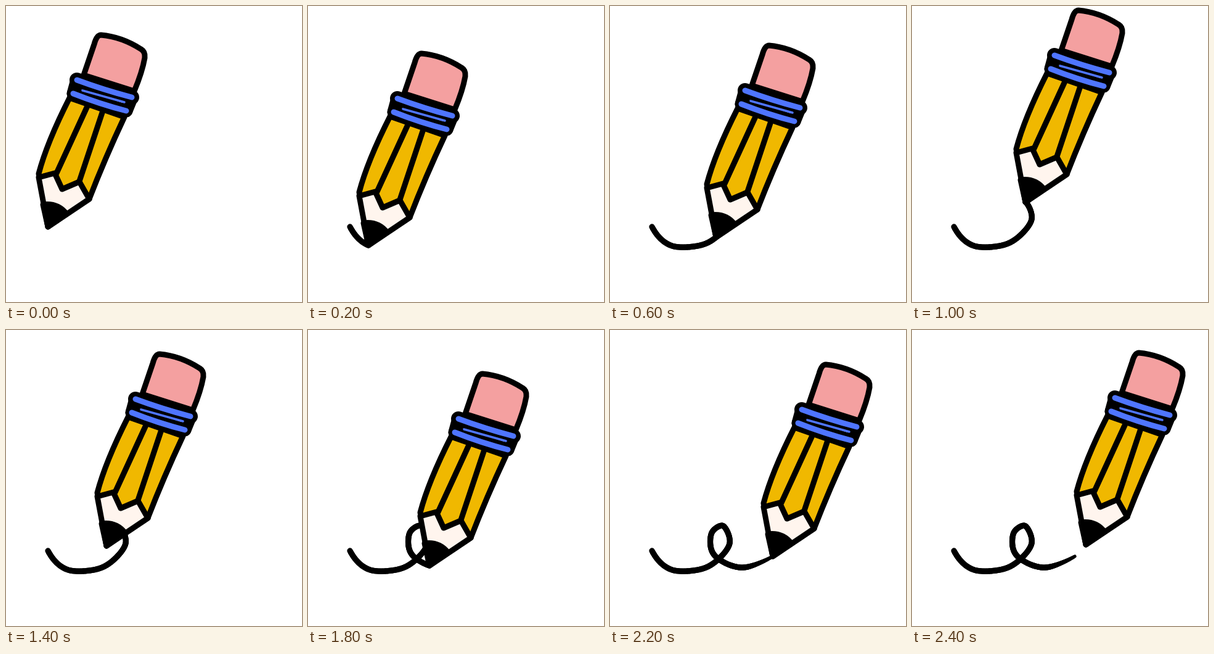
These frames come from a looping animation (480 by 480 pixels, 2.6 s). An HTML page with a canvas:

```html
<!DOCTYPE html>
<html lang="en">
<head>
<meta charset="utf-8">
<title>Pencil drawing a loop</title>
<style>
  html, body { margin: 0; width: 100%; height: 100%; overflow: hidden; background: #fff; }
  canvas { display: block; width: 480px; height: 480px; }
</style>
</head>
<body>
<canvas width="480" height="480"></canvas>
<script>
const ctx = document.querySelector('canvas').getContext('2d');
const STEP = 200, STEPS = 13, INK = '#000', BLUE = '#4f75ff';

// Where the tip stands at each step; the first point only bends the start of the line
const tips = [
  [49, 296], [68, 358], [98, 388], [142, 389], [172, 375], [194, 346], [184, 318],
  [166, 327], [163, 350], [172, 368], [197, 382], [224, 384], [264, 367], [282, 348]
];

// Catmull-Rom point on the tip's path, u counted in steps
function pathPoint(u) {
  const i = Math.floor(u), t = u - i;
  return [0, 1].map(c => {
    const [a, b, d, e] = [0, 1, 2, 3].map(k => tips[Math.min(i + k, STEPS)][c]);
    return b + t * (d - a + t * (2 * a - 5 * b + 4 * d - e + t * (3 * (b - d) + e - a))) / 2;
  });
}

function stroke(path, color, width) {
  ctx.strokeStyle = color;
  ctx.lineWidth = width;
  ctx.stroke(new Path2D(path));
}

function shape(path, fill) {
  ctx.fillStyle = fill;
  ctx.fill(new Path2D(path));
  stroke(path, INK, 9);
}

function band(path, border) {
  stroke(path, INK, border);
  stroke(path, BLUE, 9);
}

function drawLine(end) {
  const du = 1 / 16;
  for (let u = 0; u < end; u += du) {
    const width = Math.min(9.3, 5 + 4 * (STEPS - 2 - u));
    stroke(`M${pathPoint(u)}L${pathPoint(u + du)}`, INK, width);
  }
}

function drawPencil(x, y) {
  ctx.save();
  ctx.translate(x - tips[1][0], y - tips[1][1]);
  shape('M126 112L143 62Q147 47 154 47Q188 50 219 70Q226 74 225 84Q221 107 208 138Z', '#f4a0a0');
  shape('M103 149Q66 222 53 272L68 358L135 313Q160 248 192 180Z', '#f0b800');
  stroke('M134 158L82 271M158 167L119 284', INK, 9);
  shape('M53 278L79 271L91 297L119 285L135 313L68 358Z', '#fff5ee');
  shape('M60 322Q84 319 98 337L68 358Z', INK);
  stroke('M115 120L204 148L195 170L109 142Z', INK, 21);
  band('M115 120Q158 136 204 148', 24);
  band('M109 142Q152 159 195 170', 21);
  stroke('M124 137L192 156', BLUE, 3.5);
  ctx.restore();
}

function draw(now) {
  const step = Math.floor(now / STEP) % STEPS;
  ctx.clearRect(0, 0, 480, 480);
  ctx.lineCap = ctx.lineJoin = 'round';
  drawLine(Math.min(step, STEPS - 2));
  drawPencil(...pathPoint(step));
  requestAnimationFrame(draw);
}
draw(performance.now());
</script>
</body>
</html>
```
